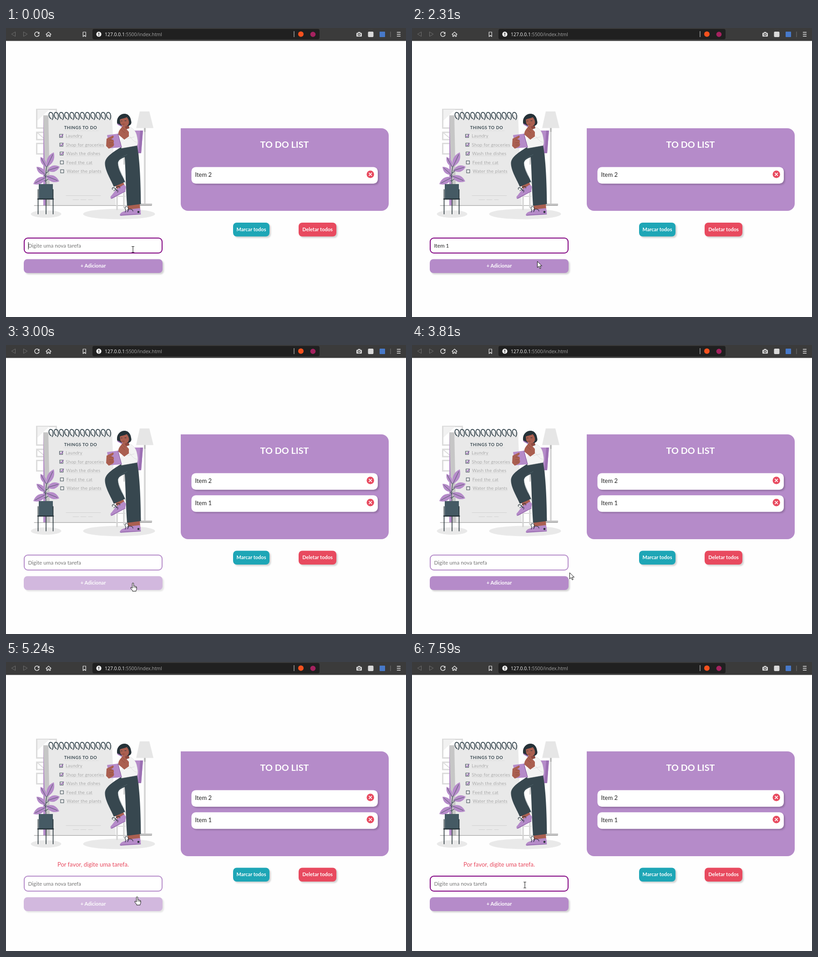
Recreate the animation shown at these times as an HTML page. Size 879 by 637 pixels, loop 8000 ms.

```html
<!DOCTYPE html>
<html lang="pt">
<head>
<meta charset="utf-8">
<title>To do list</title>
<style>
html, body { margin: 0; width: 100%; height: 100%; overflow: hidden; background: #fefefe; }
svg { display: block; width: 879px; height: 637px; font-family: Lato, "Open Sans", sans-serif; }
.mid { text-anchor: middle; }
.btn { fill: #fff; font-weight: 700; font-size: 11px; text-anchor: middle; }
.shadow { filter: drop-shadow(3px 3px 1.5px rgba(0, 0, 0, .17)); }
.url { font: 10.4px "Open Sans", "Noto Sans", sans-serif; fill: #a5a5a5; }
.note { font-size: 9.6px; font-weight: 300; letter-spacing: .5px; fill: #777; }
.line { fill: none; stroke-linecap: round; stroke-linejoin: round; }
</style>
</head>
<body>
<svg id="stage" viewBox="0 0 879 637"></svg>
<script>
const LILAC = '#b58bc9', INK = '#263238', SLATE = '#37474f', SKIN = '#aa5f50', RED = '#e84a5f';

const shape = (d, fill, extra = '') => `<path d="${d}" fill="${fill}" ${extra}/>`;
const line = (d, color, width = 1) => `<path class="line" d="${d}" stroke="${color}" stroke-width="${width}"/>`;
const box = (x, y, w, h, fill, r = 0, extra = '') =>
  `<rect x="${x}" y="${y}" width="${w}" height="${h}" rx="${r}" fill="${fill}" ${extra}/>`;
const text = (x, y, str, attrs = '') => `<text x="${x}" y="${y}" ${attrs}>${str}</text>`;
const dot = (x, y, r, fill) => `<circle cx="${x}" cy="${y}" r="${r}" fill="${fill}"/>`;
const oval = (x, y, rx, ry, fill) => `<ellipse cx="${x}" cy="${y}" rx="${rx}" ry="${ry}" fill="${fill}"/>`;

function toolbar() {
  const pale = '#e8e8e8';
  return box(0, 0, 879, 28.5, '#3b3b3b') + box(190, 2, 499, 23, '#202020', 4) +
    line('M20.500 9V18.500L12.500 13.700Z', '#707070') + line('M38.500 9V18.500L46.500 13.700Z', '#707070') +
    line('M72.200 11A5 5 0 1 0 72.800 15', pale, 1.5) + shape('M73.500 8.500V13H69Z', pale) +
    line('M88 14L93.500 9L99 14M89.500 13V18.500H92V15.500H95V18.500H97.500V13', pale, 1.3) +
    line('M169.300 9H175.300V19L172.300 16.300L169.300 19Z', pale, 1.2) +
    dot(204, 13.7, 5.6, '#f2f2f2') + box(203.2, 10.3, 1.7, 4.3, '#202020') + box(203.2, 15.6, 1.7, 1.7, '#202020') +
    text(217, 17.5, '<tspan fill="#f4f4f4">127.0.0.1</tspan>:5500/index.html', 'class="url"') +
    box(632.5, 7, 1, 13, '#ddd') + dot(648, 13.5, 6, '#f4511e') + dot(674.500, 14, 5.8, '#a5225f') +
    box(770, 10.5, 12, 8.5, '#d5d5d5', 1.5) + box(773.5, 8.7, 5, 3, '#d5d5d5') +
    dot(776, 14.600, 3, '#444') + dot(776, 14.600, 1.7, '#d5d5d5') +
    box(795.5, 8, 12, 12, '#d9d9d9', 2) + box(821, 8, 12, 12, '#4779c9', 1) +
    box(844.5, 8, 1, 12, '#777') + line('M859.500 9.500H866.500M859.500 13.700H866.500M859.500 18H866.500', pale, 1.4);
}

// Almond leaf from stem to tip, with its vein
function leaf(x1, y1, x2, y2, w) {
  const mx = x1 + (x2 - x1) * .5, my = y1 + (y2 - y1) * .5, len = Math.hypot(x2 - x1, y2 - y1);
  const nx = -(y2 - y1) / len * w, ny = (x2 - x1) / len * w;
  return shape(`M${x1} ${y1}Q${mx + nx} ${my + ny} ${x2} ${y2}Q${mx - nx} ${my - ny} ${x1} ${y1}Z`, LILAC) +
    line(`M${x1} ${y1}L${x1 + (x2 - x1) * .85} ${y1 + (y2 - y1) * .85}`, SLATE, .8);
}

function room() {
  const frames = [[178, 44], [228.5, 19], [253, 26]].map(([y, h]) =>
    box(67.5, y + 1.5, 43, h - 3, '#fff', 0, 'stroke="#dcdcdc" stroke-width="3"'));
  return oval(88, 410, 33.5, 8, '#e9e9e9') + oval(248.500, 410, 79, 11.5, '#e9e9e9') + frames.join('') +
    shape('M69 180H95L69 204Z', '#f1f1f1') + line('M69 231L82 242', '#dcdcdc', 2) +
    box(303, 220, 4, 168, '#d8d8d8') + box(303, 220, 4, 9, '#bdbdbd') +
    shape('M294 184H315L324 220.500H286Z', '#e6e6e6') + box(288, 387, 33, 4, '#c4c4c4') +
    box(82, 194, 5, 197, LILAC) + shape('M82 192.500H94L97 391H88Z', '#c6c6c6') +
    shape('M93 192H233L241 391H97Z', '#e9e9e9') + line('M62 391.300H320', '#777', .8);
}

function notepad() {
  const coils = Array.from({ length: 12 }, (_, i) => {
    const x = 97 + i * 11.5;
    return line(`M${x + 2} 200C${x - 4} 196 ${x - 4} 186 ${x + 1} 186C${x + 7} 186 ${x + 8} 197 ${x + 4.500} 202`, SLATE, 1.8);
  });
  const tasks = ['Laundry', 'Shop for groceries', 'Wash the dishes', 'Feed the cat', 'Water the plants'].map((task, i) => {
    const x = 117.5 + i * .6, y = 234.3 + i * 19.5;
    return box(x, y, 7, 7, 'none', 0, `stroke="${SLATE}"`) +
      (i < 3 ? line(`M${x + 1.500} ${y + 3.500}l2 2l4.500 -5.500`, '#8c4fae', 1.3) : '') +
      text(x + 13.5, y + 7, task, 'class="note"') +
      line(`M${x + 14} ${y + 8.500}H${[168, 216, 207, 190, 210][i]}`, '#d2d2d2', .7);
  });
  return coils.join('') +
    text(164, 223, 'THINGS TO DO', `class="mid" font-size="9.2" font-weight="700" letter-spacing=".6" fill="${SLATE}"`) +
    line('M127 226.500H203', '#d6d6d6', .7) + tasks.join('') +
    line('M132 369.500H208', '#cfcfcf', .9) + line('M147 378.500H160M164 378.500H176M181 378.500H190', '#cfcfcf', .9);
}

function plant() {
  return line('M88 346C86 325 88 310 91 300M88 330L80 318M88 320L98 312M88 338L76 333M88 336L100 329', SLATE, 1.2) +
    leaf(90, 306, 105, 274, 14) + leaf(88, 306, 76, 284, 10) + leaf(91, 314, 118, 306, 14) +
    leaf(87, 324, 67, 306, 12) + leaf(88, 329, 60, 344, 14) + leaf(88, 326, 117, 338, 14) +
    box(72, 344, 31, 32, '#455a64') +
    line('M70.500 356V410M103.500 356V410M88 378V410', INK, 1.6) + line('M70 377H104', INK, 2.6);
}

function woman() {
  return line('M244 365V400M259.500 278V300M259 355V396', '#d2d2d2', 3) + line('M242 371H262', '#dadada', 2) +
    box(287, 270, 5, 118, '#d6d6d6') +
    shape('M278 226H301L297 276H287Z', LILAC) + shape('M295 226H301L297 276H291Z', '#9c70b3') +
    // standing leg and its shoe
    shape('M267 388H294L295 400H268Z', SKIN) +
    shape('M250 412C252 404 262 405 268 400L294 397C297 402 296 408 296 411L252 414Z', LILAC) +
    line('M251 412.500L296 410', '#8d62a5', 1.2) + dot(291, 405.500, 2.300, INK) +
    line('M262 406C266 400 258 397 263 394C269 391 271 401 267 405M267 401C272 397 279 400 279 404', INK, 1.1) +
    shape('M262 268L288 258C294 290 296 340 296.500 388L266 392C263 350 263 310 260 270Z', SLATE) +
    // bent leg and its shoe
    shape('M240 347L257 339L261 347L245 357Z', SKIN) +
    shape('M242 356L259 345L264 350L262 360L234 376C229 377 228 372 232 369Z', LILAC) +
    line('M231 376L262 360', '#8d62a5', 1.2) +
    line('M245 362C249 357 240 354 237 359M243 359C239 349 231 351 234 356M241 354C245 347 252 349 250 353', INK, 1.1) +
    shape('M253 262L287 258L290 275C270 282 248 286 246 297C246 311 255 325 262 339L237 350C231 335 217 314 217.500 297C219 282 239 272 253 262Z', SLATE) +
    line('M262 342C257 324 246 310 246 297C248 287 259 283 266 279', '#61747d', .6) +
    // blouse, neck and arm
    shape('M266 217C278 218 286 227 288 240C290 250 290 255 288 259L254 265C250 258 252 248 257 243L263 236Z', '#f3f3f3', 'stroke="#d4d4d4" stroke-width=".6"') +
    line('M271 238C278 246 281 251 288 252M266 244L282 240', '#ccc', .6) +
    shape('M258 210H269L271 221L262 224Z', '#8d493f') +
    // head
    shape('M244 208C243 196 253 188 262 189C270 190 274 197 275 205C277 211 273 215 268 216L252 215C247 214 244 212 244 208Z', INK) +
    shape('M250 201C256 200 262 195 266 197C271 204 272 210 267 215C261 219 254 216 251 210Z', SKIN) +
    shape('M247 205C250 199 258 201 266 196L257 191Z', INK) +
    line('M253 205H255M261 204.500H264', INK, 1) + line('M256 212H260', '#732f2a', .8) +
    // raised hand with pen
    line('M246 212L260 220', '#9c70b3', 2.4) +
    shape('M247 235C246 228 251 223 254 219C258 213 262 215 262 220L270 229L270 239L260 246Z', SKIN) +
    line('M253 224L261 231M256 219L262 226', '#884437', .7) +
    // pad and holding hand
    shape('M222 236L246 233L254 263L228 265Z', LILAC) + line('M246 233L254 263', '#8d62a5', 1.2) +
    shape('M221 244L235 237C238 239 237 242 231 245C238 247 238 250 236 253C239 256 237 260 234 262L226 266L220 260Z', SKIN) +
    line('M228 247L236 247M227 253L236 253M228 258L235 258', '#884437', .7);
}

function item(name, y) {
  return box(407.5, y, 409.5, 36.5, '#fff', 9.5, 'class="shadow"') +
    text(415.5, y + 21.3, name, 'font-size="13" fill="#222"') +
    dot(800.7, y + 16, 8.2, RED) + line(`M797.900 ${y + 13.200}l5.600 5.600m0 -5.600l-5.600 5.600`, '#fff', 1.7);
}

function button(id, x, y, w, fill, label) {
  return `<g id="${id}">${box(x, y, w, 30.5, fill, 8, 'class="shadow"')}${text(x + w / 2, y + 18.5, label, 'class="btn"')}</g>`;
}

document.getElementById('stage').innerHTML = box(0, 0, 879, 637, '#fefefe') + toolbar() +
  `<g id="art">${room()}${notepad()}${plant()}${woman()}</g>` +
  text(191.5, 450.5, 'Por favor, digite uma tarefa.', `id="error" class="mid" font-size="13" fill="${RED}"`) +
  `<g id="form">
    ${box(40, 463, 303, 33, '#fff', 8, 'id="field" stroke-width="2"')}
    ${text(48.5, 484, '', 'id="entry" font-size="11.7"')}
    ${box(0, 472, 1, 16, '#111', 0, 'id="caret"')}
    ${button('add', 39, 509.5, 305, LILAC, '+ Adicionar')}
  </g>
  <path id="panel" fill="${LILAC}"/>
  <g id="list">${text(612, 264, 'TO DO LIST', 'class="mid" font-size="19.800" font-weight="700" fill="#fff"')}${item('Item 2', 306.5)}
    <g id="extra">${item('Item 1', 355.3)}</g></g>
  <g id="actions">${button('mark', 499, 429, 80, '#1ea6b6', 'Marcar todos')}${button('clear', 643, 429, 83, RED, 'Deletar todos')}</g>
  <g id="beam">${line('M-2.500 -6.500H-.8L0 -6L.8 -6.500H2.500M0 -6V6M-2.500 6.500H-.8L0 6L.8 6.500H2.500', '#222', 1.1)}</g>
  <g id="arrow">${shape('M.5 .5V14L3.800 11L6 16.300L8.200 15.300L6 10.300H10.500Z', '#fff', 'stroke="#111"')}</g>
  <g id="hand">${shape('M-2 2Q-2 .5 -.5 .5T1 2V7Q3 6.300 3.700 7.800Q5.500 7 6 8.700Q7.600 8.300 7.600 10V13.500Q7.500 15.500 6.300 17V18.700H-1.500V17.200L-5.600 12Q-6 9.500 -3.800 10.400L-2 12Z', '#fff', 'stroke="#111"')}
    ${line('M1 8V11M3.700 8.500V11M6 9.500V11.500', '#111', .8)}</g>`;

const el = Object.fromEntries([...document.querySelectorAll('[id]')].map(e => [e.id, e]));

// Each step overrides part of the state; caret is its x, 0 when off
const steps = [
  [0, { entry: '', caret: 48.7, focus: true, hover: false, added: false, error: false, cursor: ['beam', 279, 488] }],
  [370, { caret: 0 }],
  [620, { entry: 'Item', caret: 74 }],
  [1120, { caret: 0 }],
  [1500, { entry: 'Item 1', caret: 81 }],
  [2030, { caret: 0 }],
  [2180, { cursor: ['beam', 276, 497] }],
  [2310, { cursor: ['arrow', 275, 514] }],
  [2460, { hover: true, cursor: ['hand', 277, 521] }],
  [2610, { caret: 81, cursor: ['hand', 279.5, 524] }],
  [3000, { entry: '', caret: 0, focus: false, added: true }],
  [3510, { cursor: ['hand', 281, 524] }],
  [3660, { hover: false, cursor: ['arrow', 338, 501] }],
  [3810, { cursor: ['arrow', 346, 501.5] }],
  [3940, { cursor: ['arrow', 351, 503.5] }],
  [4190, { hover: true, cursor: ['hand', 334, 511] }],
  [4320, { cursor: ['hand', 314, 513] }],
  [4470, { cursor: ['hand', 297, 515] }],
  [4600, { cursor: ['hand', 288.5, 517] }],
  [5240, { error: true }],
  [6390, { cursor: ['hand', 276, 515] }],
  [6540, { hover: false, cursor: ['beam', 249.5, 493.5] }],
  [6680, { cursor: ['beam', 248, 491.5] }],
  [7090, { focus: true, caret: 48.7 }],
  [7590, { caret: 0 }]
];

const show = (e, on) => e.setAttribute('visibility', on ? 'visible' : 'hidden');
const shift = (e, x, y) => e.setAttribute('transform', `translate(${x} ${y})`);

function draw(s) {
  shift(el.art, 0, s.error ? -9 : 0);
  shift(el.form, 0, s.error ? 9 : 0);
  show(el.error, s.error);
  el.field.setAttribute('stroke', s.focus ? '#800080' : LILAC);
  el.entry.textContent = s.entry || 'Digite uma nova tarefa';
  el.entry.setAttribute('fill', s.entry ? '#222' : '#757575');
  show(el.caret, s.caret);
  el.caret.setAttribute('x', s.caret);
  el.add.setAttribute('opacity', s.hover ? .6 : 1);

  const top = s.added ? 197 : 221, bottom = s.added ? 428 : 403;
  el.panel.setAttribute('d', `M384 ${top}H825a16 16 0 0 1 16 16V${bottom - 16}a16 16 0 0 1 -16 16H400a16 16 0 0 1 -16 -16Z`);
  shift(el.list, 0, s.added ? -24 : 0);
  shift(el.actions, 0, s.added ? 24.5 : 0);
  show(el.extra, s.added);

  const [kind, x, y] = s.cursor;
  for (const name of ['beam', 'arrow', 'hand']) show(el[name], name === kind);
  shift(el[kind], x, y);
}

const start = performance.now();
let last = -1;
function tick() {
  const t = (performance.now() - start) % 8000;
  const n = steps.filter(step => step[0] <= t).length;
  if (n !== last) draw(Object.assign({}, ...steps.slice(0, n).map(step => step[1])));
  last = n;
  requestAnimationFrame(tick);
}
tick();
</script>
</body>
</html>
```
